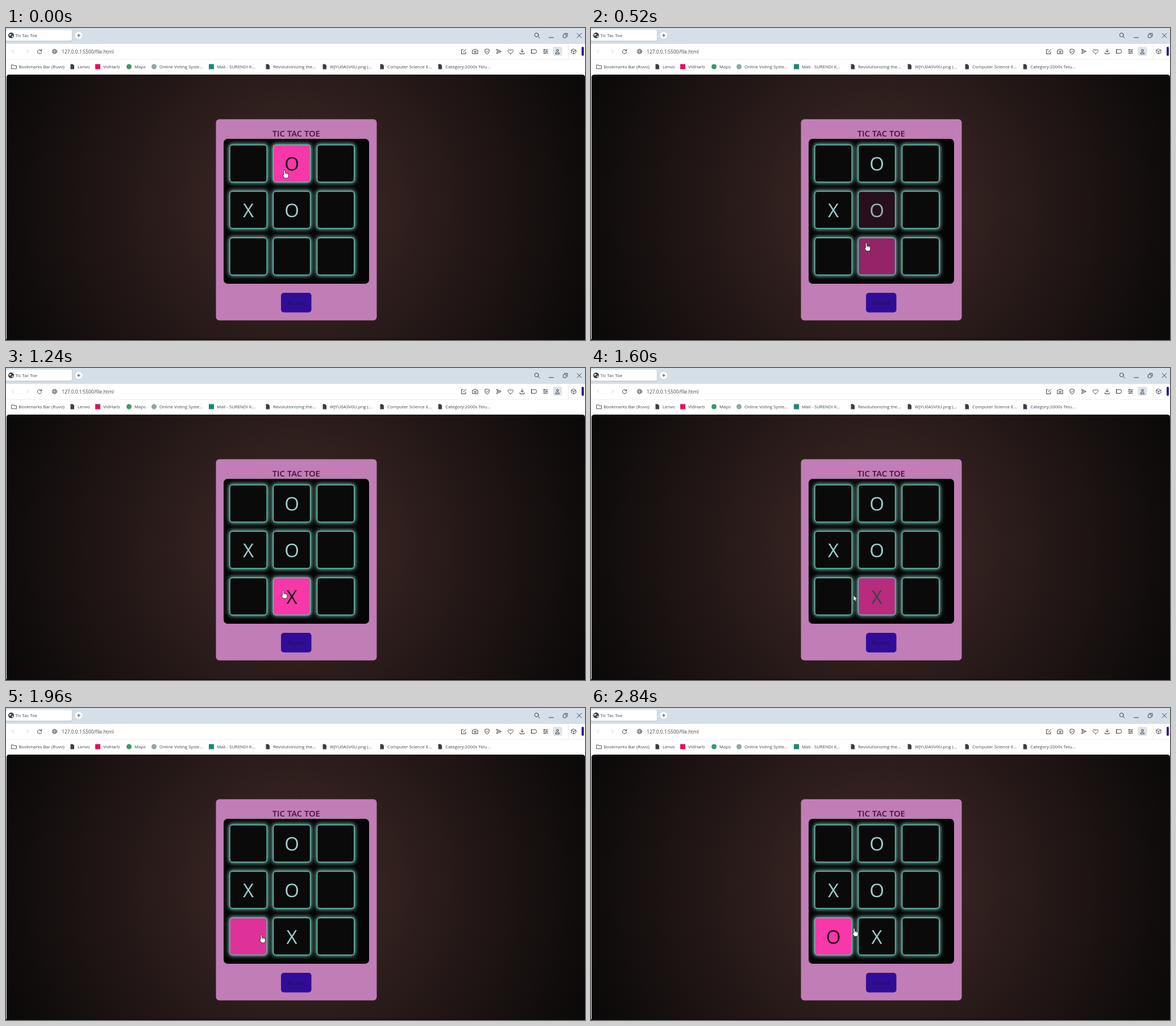
An HTML page for the animation above (2880 ms loop, 1019 by 549 pixels).

```html
<!DOCTYPE html>
<html lang="en">
<head>
<meta charset="utf-8">
<title>Tic Tac Toe</title>
<style>
  html, body { margin: 0; width: 100%; height: 100%; overflow: hidden; background: #fff; }
  svg { display: block; width: 100vw; height: 100vh; }
  text { font-family: "Open Sans", "Noto Sans", sans-serif; }
  .label { font-size: 7.8px; fill: #41454b; }
  .icon { fill: none; stroke: #3c4046; stroke-width: 1; stroke-linecap: round; stroke-linejoin: round; }
  .mark { font-size: 33px; text-anchor: middle; }
</style>
</head>
<body>
<svg viewBox="0 0 1019 549" preserveAspectRatio="none">
  <defs>
    <radialGradient id="page" gradientUnits="userSpaceOnUse" cx="510" cy="315" r="560">
      <stop offset="0" stop-color="#422b28"/>
      <stop offset="1" stop-color="#0a0808"/>
    </radialGradient>
    <filter id="blur" x="-40%" y="-40%" width="180%" height="180%">
      <feGaussianBlur stdDeviation="3.6"/>
    </filter>
    <filter id="soft" x="-10%" y="-30%" width="120%" height="160%">
      <feGaussianBlur stdDeviation="1"/>
    </filter>
    <clipPath id="boardClip"><rect x="383" y="195" width="256" height="255" rx="7"/></clipPath>
    <path id="doc" d="M-3-4.5H1L3.5-2V4.5H-3Z" fill="#3f3c46"/>
  </defs>

  <!-- Window bar -->
  <rect width="1019" height="28" fill="#d5dfe8"/>
  <rect x="1" y="4" width="115" height="19" rx="3" fill="#7d8b98" opacity=".6" filter="url(#soft)"/>
  <rect x="0" y="3" width="116" height="19.5" rx="3" fill="#fff"/>
  <circle cx="9" cy="13" r="5" fill="#3c4046"/>
  <path d="M5.5 11.5 8 10.2 9.5 11.5 7.8 13.2 6.2 13.4ZM10 14l2.4-.6.3 1.4-2 1.6Z" fill="#fff"/>
  <text x="16.5" y="15.8" class="label">Tic Tac Toe</text>
  <circle cx="128" cy="13" r="6.2" fill="#fff"/>
  <g class="icon">
    <path d="M125.5 13h5M128 10.5v5"/>
    <circle cx="933.8" cy="12.2" r="3.4"/><path d="M936.4 14.8 939.3 17.7"/>
    <path d="M955.5 16.8h8"/>
    <rect x="980.5" y="11.5" width="5.5" height="5.5" rx="1"/><path d="M982.5 9.5h5.5v5.5"/>
    <path d="M1005.2 9.5l7.6 7.6M1012.8 9.5l-7.6 7.6"/>
  </g>

  <!-- Address row -->
  <rect y="28" width="1019" height="56" fill="#fff"/>
  <rect y="55" width="1019" height="1" fill="#edf0f3"/>
  <text x="98.3" y="44.5" class="label" style="font-size:8.3px">127.0.0.1:5500/file.html</text>
  <rect x="962.5" y="33" width="16" height="16" rx="3" fill="#dde3e9"/>
  <path d="M989.5 28v27" stroke="#e2e6ea"/>
  <rect x="1013" y="33" width="4" height="16" rx="2" fill="#35109a"/>
  <g class="icon">
    <path d="M13.5 38.5 10.7 41.3 13.5 44.1M36.8 38.5 39.6 41.3 36.8 44.1" stroke="#c9ced3"/>
    <path d="M62 39.5A3.6 3.6 0 1 0 62.7 42.3M62.7 37.8V40.2H60.2"/>
    <circle cx="85.5" cy="41.3" r="4" stroke-width=".8"/>
    <ellipse cx="85.5" cy="41.3" rx="1.8" ry="4" stroke-width=".7"/>
    <path d="M81.7 40h7.6M81.7 42.7h7.6" stroke-width=".7"/>
    <path d="M805 38h-3.5v7.5h7.5V42M804.5 42.5 809.5 37.5"/>
    <path d="M821.2 39h2l1-1.5h3l1 1.5h2v6.2h-9Z"/><circle cx="825.7" cy="42" r="1.6"/>
    <path d="M846.7 37 850.4 38.3V41.5Q850 44.5 846.7 46 843.4 44.5 843 41.5V38.3ZM845 41.5l1.3 1.3 2.3-2.4"/>
    <path d="M863.5 37.5 871.5 41.3 863.5 45.2 865 41.3ZM865 41.3h3"/>
    <path d="M888 45.5C880.5 41 883.5 36 888 39.2 892.5 36 895.5 41 888 45.5Z"/>
    <path d="M908.3 37v5.5M905.8 40.3l2.5 2.4 2.5-2.4M904.5 43.5v2h7.6v-2"/>
    <path d="M925 38h6.3q2 0 2 1.7v3q0 1.8-2 1.8H925ZM924.8 38v6.5"/>
    <path d="M945.5 38.4h8M945.5 41.3h8M945.5 44.2h8M947.5 37.4v2M951.5 40.3v2M948.5 43.2v2"/>
    <circle cx="970.4" cy="39.3" r="1.8"/><path d="M967 45.2q0-2.7 3.4-2.7t3.4 2.7Z"/>
    <path d="M999 37l4 2.1v4.4l-4 2.2-4-2.2V39.1ZM995 39.1l4 2.2 4-2.2M999 41.3v4.4" stroke-width=".9"/>
    <path d="M10 65h3l1 1.3h4.5v5.4H10Z" stroke-width=".9"/>
  </g>
  <g id="bookmarks"></g>

  <!-- Page -->
  <path d="M1 549V87q0-5 5-5H1014q5 0 5 5V549Z" fill="url(#page)"/>
  <rect y="547.5" width="1019" height="1.5" fill="#14070a"/>
  <rect x="369.5" y="160.5" width="283" height="354" rx="6" fill="#c07db6"/>
  <text x="510.8" y="190.8" text-anchor="middle" font-size="14.8" font-weight="600" fill="#4c1040">TIC TAC TOE</text>
  <rect x="383" y="195" width="256" height="255" rx="7" fill="#050505"/>
  <g id="glows" clip-path="url(#boardClip)"></g>
  <g id="cells"></g>
  <rect x="484" y="466" width="53.5" height="34.5" rx="5" fill="#300d99"/>
  <text x="510.7" y="487.4" text-anchor="middle" font-size="9.4" fill="#1b1145">Restart</text>

  <g id="hand" stroke="#111" stroke-width=".8" stroke-linejoin="round" fill="#fff">
    <path d="M-1.2 1Q-1.2-.4 0-.4T1.3 1V5Q2.6 4.2 3.6 5.2 4.8 4.6 5.6 5.6 7.3 5.2 7.3 7V10Q7 12 6 14H.3Q-1 11.5-3 9.4-3.4 7.7-1.2 8.6Z"/>
    <path d="M1.3 5v2.4M3.5 5.3v2.3M5.5 5.8v2" fill="none" stroke-width=".6"/>
  </g>
  <path id="arrow" d="M0 0V9.6L2.2 7.6 3.7 11.1 5.3 10.4 3.8 7.1H6.7Z" fill="#fff" stroke="#111" stroke-width=".6"/>
</svg>
<script>
const LOOP = 2880, FADE = 300;
const el = id => document.getElementById(id);

const bookmarks = [
  [22.3, "Bookmarks Bar (Ruvo)"],
  [126, "Lenvo", "doc"],
  [171, "VidHarb", "square", "#e0125c"],
  [226, "Maps", "circle", "#3a9a68"],
  [270, "Online Voting Syste...", "circle", "#8fa5a6"],
  [371, "Mail - SURENDI K...", "square", "#178a72"],
  [470, "Revolutionizing the...", "doc"],
  [570, "WJYU0ASV0U.png (...", "doc"],
  [671, "Computer Science E...", "doc"],
  [773.3, "Category:2000s Telu...", "doc"]
];
const badge = {
  doc: x => `<use href="#doc" x="${x}" y="68"/>`,
  square: (x, c) => `<rect x="${x - 4.5}" y="63.5" width="9" height="9" fill="${c}"/>`,
  circle: (x, c) => `<circle cx="${x}" cy="68" r="4.5" fill="${c}"/>`
};
el("bookmarks").innerHTML = bookmarks.map(([x, name, kind, color]) =>
  (kind ? badge[kind](x - 9.5, color) : "") +
  `<text x="${x}" y="70.8" class="label">${name}</text>`).join("");

// Each played cell: its mark, when the mark appears, hover start and end
const plays = {
  1: { mark: "O", at: 0, enter: -500, leave: 100 },
  3: { mark: "X", at: 0 },
  4: { mark: "O", at: 0, enter: 203, leave: 355 },
  6: { mark: "O", at: 2560, enter: 1776, leave: 2840 },
  7: { mark: "X", at: 1160, enter: 420, leave: 1545 }
};
const columns = [426.5, 503, 580.2], rows = [238.3, 320, 401.8];
const size = 65.2;
let glows = "", cells = "";
for (let i = 0; i < 9; i++) {
  const x = columns[i % 3], y = rows[Math.floor(i / 3)];
  const box = grow => `x="${x - size / 2 - grow}" y="${y - size / 2 - grow}" width="${size + 2 * grow}" height="${size + 2 * grow}"`;
  glows += `<rect ${box(1.6)} rx="6" fill="#86cfca" filter="url(#blur)"/>`;
  cells += `<rect id="cell${i}" ${box(0)} rx="4.5" fill="#0a0a0a" stroke="#5cc0a6" stroke-width="1.5"/>`;
  if (plays[i]) cells += `<text id="mark${i}" class="mark" x="${x}" y="${y + 12.8}">${plays[i].mark}</text>`;
}
el("glows").innerHTML = glows;
el("cells").innerHTML = cells;

const clamp = v => Math.min(1, Math.max(0, v));
const bezier = (s, a, b) => 3 * s * (1 - s) ** 2 * a + 3 * s * s * (1 - s) * b + s ** 3;

// The CSS "ease" curve, solved by bisection
function ease(p) {
  let low = 0, high = 1;
  for (let i = 0; i < 18; i++) {
    const mid = (low + high) / 2;
    if (bezier(mid, 0.25, 0.25) < p) low = mid; else high = mid;
  }
  return bezier(low, 0.1, 1);
}

function hover(t, { enter, leave }) {
  if (enter === undefined) return 0;
  const rise = ease(clamp((Math.min(t, leave) - enter) / FADE));
  return rise * (1 - ease(clamp((t - leave) / FADE)));
}

const mix = (a, b, k) => `rgb(${a.map((v, i) => Math.round(v + (b[i] - v) * k))})`;
const dark = [10, 10, 10], pink = [248, 55, 169], pale = [159, 208, 206], ink = [17, 17, 17];

// Pointer tip: time, x, y
const path = [
  [0, 490, 250], [100, 487, 271], [203, 482, 287], [320, 478, 345], [355, 478, 353],
  [420, 481, 369], [600, 487, 386], [840, 489, 391], [1400, 487, 392], [1545, 469, 399],
  [1600, 462, 400], [1776, 459, 400], [1800, 454, 400], [2000, 448, 399],
  [2280, 447, 399], [2640, 448, 398], [2840, 463, 388], [2880, 465, 386]
];
const arrowTimes = [[110, 203], [360, 420], [1560, 1776]];

function pointer(t) {
  const i = path.findIndex(p => p[0] > t);
  const [t0, x0, y0] = path[i - 1], [t1, x1, y1] = path[i];
  const k = (t - t0) / (t1 - t0);
  return [x0 + (x1 - x0) * k, y0 + (y1 - y0) * k];
}

function draw(t) {
  for (const i in plays) {
    const level = hover(t, plays[i]);
    el("cell" + i).setAttribute("fill", mix(dark, pink, level));
    const mark = el("mark" + i);
    mark.setAttribute("fill", mix(pale, ink, level));
    mark.setAttribute("visibility", t >= plays[i].at ? "visible" : "hidden");
  }
  const place = `translate(${pointer(t).map(v => v.toFixed(2))})`;
  const isArrow = arrowTimes.some(([a, b]) => t >= a && t < b);
  for (const id of ["hand", "arrow"]) {
    el(id).setAttribute("transform", place);
    el(id).setAttribute("visibility", (id === "arrow") === isArrow ? "visible" : "hidden");
  }
}

const start = performance.now();
function tick() {
  draw((performance.now() - start) % LOOP);
  requestAnimationFrame(tick);
}
tick();
</script>
</body>
</html>
```
